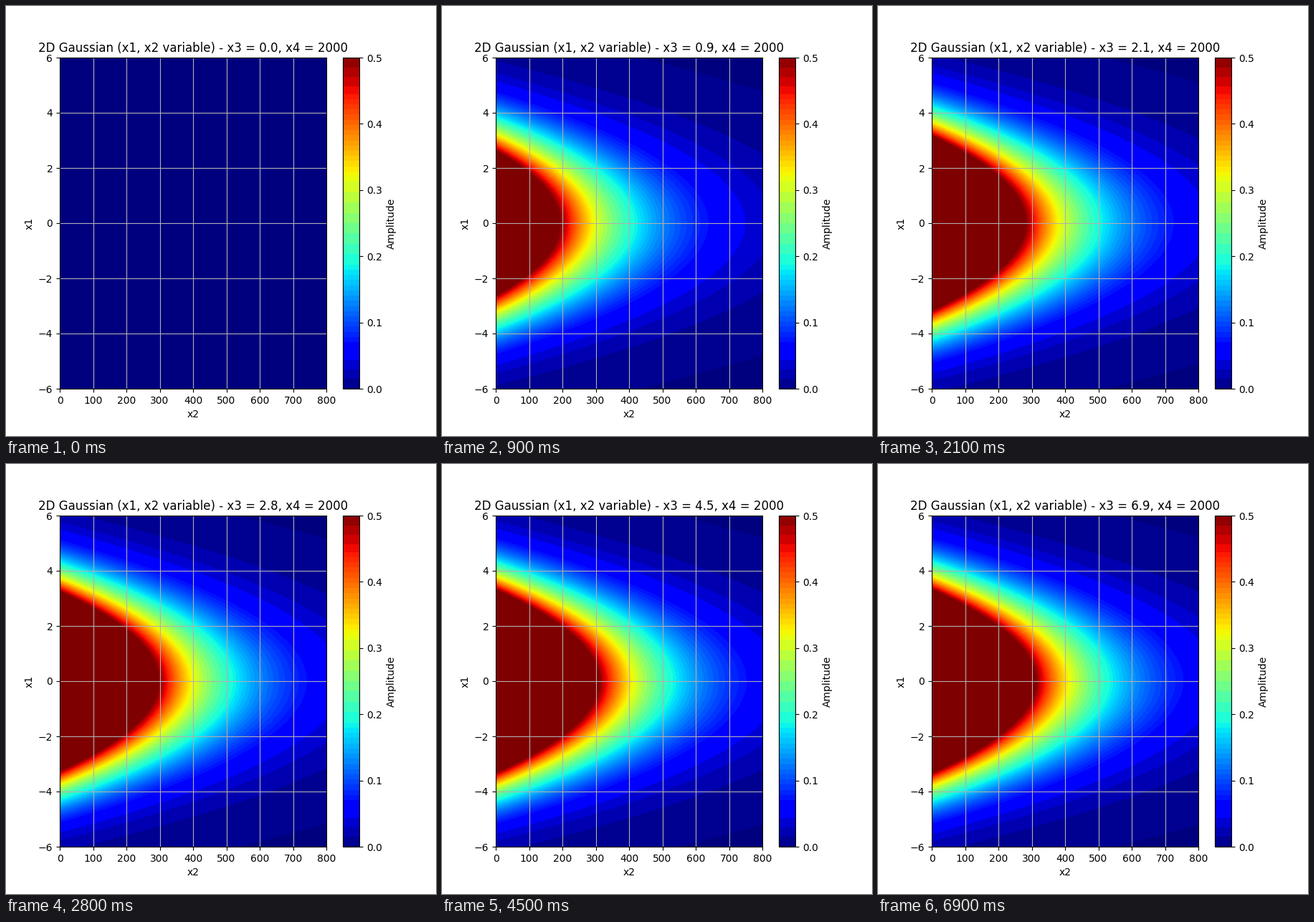
A matplotlib script for the animation above (7 s loop, 600 by 600 pixels).

```python
import numpy as np
import matplotlib.pyplot as plt
from matplotlib.animation import FuncAnimation
from matplotlib.colors import ListedColormap

FRAMES, INTERVAL = 70, 100
WIDTH, HEIGHT = 372, 462          # axes size in pixels
X4 = 2000
SIGMA, DECAY, VMAX = 2.0, 225.0, 0.5


def banded_jet():
    """Jet reduced to flat bands, coarser at both ends and in the greens."""
    edges = [0, 1, 8, 15, 22, *range(36, 96, 4), *range(96, 160, 8),
             *range(160, 228, 4), 228, 234, 241, 248, 255, 256]
    jet = plt.get_cmap("jet")
    colors = np.empty((256, 4))
    for lo, hi in zip(edges, edges[1:]):
        colors[lo:hi] = jet((lo + hi - 1) // 2)
    return ListedColormap(colors)


x2 = (np.arange(WIDTH) + 0.5) / WIDTH * 800
x1 = 6 - (np.arange(HEIGHT) + 0.5) / HEIGHT * 12
shape = X4 / 1000 * np.exp(-x1[:, None] ** 2 / (2 * SIGMA ** 2) - x2 / DECAY)


def field(x3):
    return shape * (1 - np.exp(-x3))


fig, ax = plt.subplots(figsize=(6, 6), dpi=100)
im = ax.imshow(field(0), cmap=banded_jet(), vmin=0, vmax=VMAX,
               extent=(0, 800, -6, 6), aspect="auto", interpolation="nearest")
fig.colorbar(im, ax=ax, label="Amplitude")
ax.set_xlabel("x2")
ax.set_ylabel("x1")
ax.grid(True)
title = ax.set_title("")


def update(i):
    x3 = i * 0.1
    im.set_data(field(x3))
    title.set_text(f"2D Gaussian (x1, x2 variable) - x3 = {x3:.1f}, x4 = {X4}")
    return im, title


anim = FuncAnimation(fig, update, frames=FRAMES, interval=INTERVAL,
                     repeat=True, repeat_delay=0)
plt.show()
```
